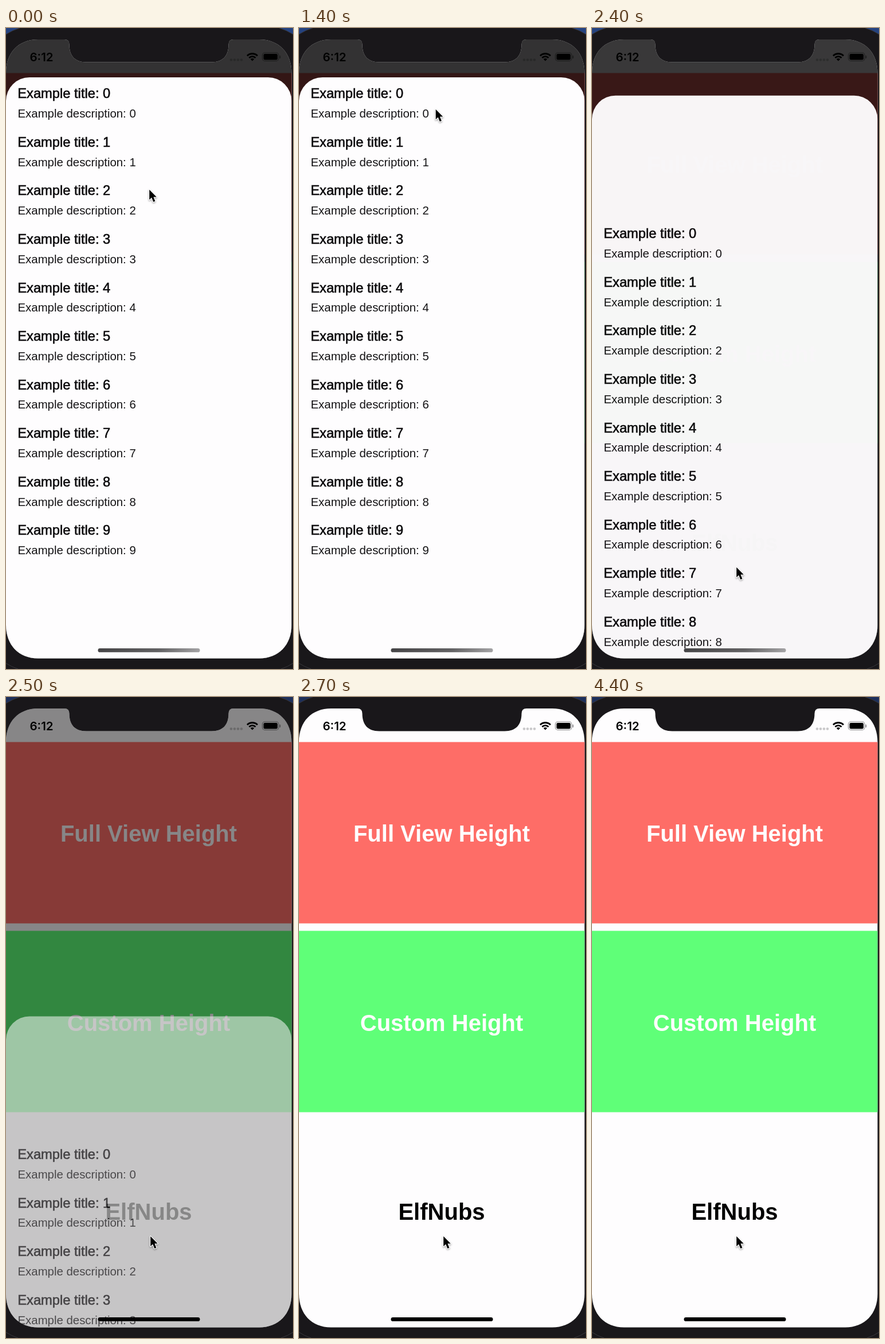
These frames come from a looping animation (501x1117 px, 4500 ms). An HTML page with a canvas:

```html
<!DOCTYPE html>
<html lang="en">
<head>
<meta charset="utf-8">
<title>Bottom sheet demo</title>
<style>
  html, body { margin: 0; width: 100%; height: 100%; overflow: hidden; background: #19171a; }
  canvas { display: block; }
</style>
</head>
<body>
<canvas id="stage" width="501" height="1117"></canvas>
<script>
const W = 501, H = 1117, LOOP = 4500, STEP = 100;
const SANS = '"Liberation Sans", Arial, sans-serif';
const WHITE = '#fefdfe', BEZEL = '#19171a';
const SHEET_TOP = 86, ROW = 84.57;
const DISMISS = { start: 2365, length: 280 };

const ctx = document.getElementById('stage').getContext('2d');
const layer = document.createElement('canvas');
layer.width = W;
layer.height = H;
const sheetCtx = layer.getContext('2d');

// Pointer tip: time, x, y
const POINTER = [
  [0, 249.5, 281], [100, 238, 272], [200, 196, 243], [300, 178, 231],
  [600, 178, 231], [800, 192, 208], [1000, 226, 158], [1200, 238, 141],
  [1400, 238, 141], [1800, 236.5, 145], [1900, 236, 165], [2000, 236, 240],
  [2100, 236.5, 347], [2200, 240, 520], [2300, 246, 755], [2400, 251.5, 939]
];

function pointerAt(t) {
  const i = POINTER.findIndex(p => p[0] > t);
  if (i < 0) return POINTER[POINTER.length - 1].slice(1);
  const [t0, x0, y0] = POINTER[i - 1], [t1, x1, y1] = POINTER[i];
  const u = (t - t0) / (t1 - t0);
  return [x0 + (x1 - x0) * u, y0 + (y1 - y0) * u];
}

function dismissAt(t) {
  const u = Math.min(1, Math.max(0, (t - DISMISS.start) / DISMISS.length));
  return u < 0.5 ? 2 * u * u : 1 - 2 * (1 - u) * (1 - u);
}

// Overscroll resists the drag
function overscroll(t, y) {
  const d = t < 1800 ? 0 : Math.max(0, y - 145);
  return 0.31 * d / (1 + d / 5000);
}

function box(c, x, y, w, h, color, r = 0) {
  c.fillStyle = color;
  c.beginPath();
  c.roundRect(x, y, w, h, r);
  c.fill();
}

function label(c, text, x, y, font, color, align = 'left') {
  c.font = font;
  c.fillStyle = color;
  c.textAlign = align;
  c.fillText(text, x, y);
}

function screenPath() {
  const p = new Path2D();
  p.moveTo(56, 20);
  p.lineTo(102, 20);
  p.quadraticCurveTo(110.5, 20, 110.5, 29);
  p.bezierCurveTo(110.5, 48, 120, 59.5, 140, 59.5);
  p.lineTo(359, 59.5);
  p.bezierCurveTo(379, 59.5, 388.5, 48, 388.5, 29);
  p.quadraticCurveTo(388.5, 20, 397, 20);
  p.lineTo(442, 20);
  p.bezierCurveTo(476, 20, 498.5, 43, 498.5, 78);
  p.lineTo(498.5, 1040);
  p.bezierCurveTo(498.5, 1075, 476, 1098.5, 442, 1098.5);
  p.lineTo(56, 1098.5);
  p.bezierCurveTo(22, 1098.5, 0, 1075, 0, 1040);
  p.lineTo(0, 78);
  p.bezierCurveTo(0, 43, 22, 20, 56, 20);
  p.closePath();
  return p;
}
const SCREEN = screenPath();

function drawBody(t) {
  box(ctx, 0, 0, W, H, BEZEL);
  ctx.lineWidth = 1;
  for (const side of [0, 1]) {
    ctx.save();
    if (side) {
      ctx.translate(W, 0);
      ctx.scale(-1, 1);
    }
    ctx.fillStyle = t < 2450 ? '#24427f' : '#1d2f5a';
    ctx.beginPath();
    ctx.moveTo(0, 0);
    ctx.lineTo(24, 0);
    ctx.quadraticCurveTo(11, 4, 0, 11);
    ctx.fill();
    ctx.strokeStyle = '#38373b';
    ctx.beginPath();
    ctx.moveTo(24, 0);
    ctx.quadraticCurveTo(11, 4, 0, 11);
    ctx.moveTo(0, 1107);
    ctx.quadraticCurveTo(9, 1113, 21, 1117);
    ctx.stroke();
    ctx.restore();
  }
}

function drawStatus() {
  label(ctx, '6:12', 41.5, 57.5, '600 20.5px Inter, sans-serif', '#000');
  ctx.fillStyle = '#c9c8ca';
  for (let i = 0; i < 4; i++) {
    ctx.beginPath();
    ctx.arc(393 + i * 6, 55.5, 2.3, 0, 7);
    ctx.fill();
  }
  const arc = (r, width) => {
    ctx.lineWidth = width;
    ctx.beginPath();
    ctx.arc(430, 57.5, r, -Math.PI * 0.75, -Math.PI * 0.25);
    ctx.stroke();
  };
  ctx.strokeStyle = '#000';
  arc(12.7, 2.9);
  arc(7.9, 2.8);
  arc(2.3, 4.5);

  ctx.strokeStyle = '#8d8c8e';
  ctx.lineWidth = 1.2;
  ctx.beginPath();
  ctx.roundRect(447.5, 43, 28.5, 14.5, 4.5);
  ctx.stroke();
  box(ctx, 449.5, 45, 24.5, 10.5, '#000', 2.5);
  box(ctx, 477.5, 48, 1.7, 5, '#8d8c8e', 1);
}

function drawHome() {
  const big = 'bold 40px ' + SANS;
  box(ctx, 0, 0, W, H, WHITE);
  box(ctx, 0, 78.5, W, 316, '#fe6d67');
  box(ctx, 0, 407.5, W, 316, '#5fff78');
  label(ctx, 'Full View Height', 249, 252, big, WHITE, 'center');
  label(ctx, 'Custom Height', 249, 581.5, big, WHITE, 'center');
  label(ctx, 'ElfNubs', 249, 911, big, '#000', 'center');
  drawStatus();
}

function drawSheet(top, scroll, alpha) {
  const c = sheetCtx;
  c.clearRect(0, 0, W, H);
  box(c, 0, top, 498.5, H, WHITE, [41, 41, 0, 0]);
  c.strokeStyle = '#0c0b0d';
  c.lineWidth = 0.6;
  for (let i = 0; i < 10; i++) {
    const y = top + scroll + i * ROW;
    const title = 'Example title: ' + i;
    label(c, title, 20.3, y + 36.3, '23.7px ' + SANS, '#0c0b0d');
    c.strokeText(title, 20.3, y + 36.3);
    label(c, 'Example description: ' + i, 20.5, y + 70, '20.4px ' + SANS, '#141315');
  }
  ctx.globalAlpha = alpha;
  ctx.drawImage(layer, 0, 0);
  ctx.globalAlpha = 1;
}

function drawIndicator(covered) {
  let color = '#000';
  if (covered) {
    color = ctx.createLinearGradient(160, 1080, 338, 1088);
    color.addColorStop(0, '#454446');
    color.addColorStop(0.6, '#626163');
    color.addColorStop(1, '#a3a2a4');
  }
  box(ctx, 160.5, 1081, 178, 6.8, color, 3.4);
}

function drawPointer(x, y) {
  const arrow = new Path2D('M0 0V17.5L4 13.8L7 21.2L10.2 19.9L7.2 12.8H12.6Z');
  ctx.save();
  ctx.translate(x + 0.7, y + 0.8);
  ctx.lineJoin = 'round';
  ctx.lineWidth = 2.4;
  ctx.strokeStyle = '#fff';
  ctx.shadowColor = 'rgba(0,0,0,.35)';
  ctx.shadowBlur = 3;
  ctx.shadowOffsetY = 1.5;
  ctx.stroke(arrow);
  ctx.shadowColor = 'transparent';
  ctx.fillStyle = '#000';
  ctx.fill(arrow);
  ctx.restore();
}

function draw(t) {
  const [x, y] = pointerAt(t);
  const gone = dismissAt(t);
  drawBody(t);
  ctx.save();
  ctx.clip(SCREEN);
  drawHome();
  if (gone < 1) {
    box(ctx, 0, 0, W, H, `rgba(0,0,0,${0.8 - 0.71 * gone})`);
    drawSheet(SHEET_TOP + 1012 * gone, overscroll(t, y), 1 - gone);
  }
  drawIndicator(gone < 0.1);
  ctx.restore();
  drawPointer(x, y);
}

const begin = performance.now();
function tick() {
  const t = (performance.now() - begin) % LOOP;
  draw(Math.floor(t / STEP) * STEP);
  requestAnimationFrame(tick);
}
tick();
</script>
</body>
</html>
```
